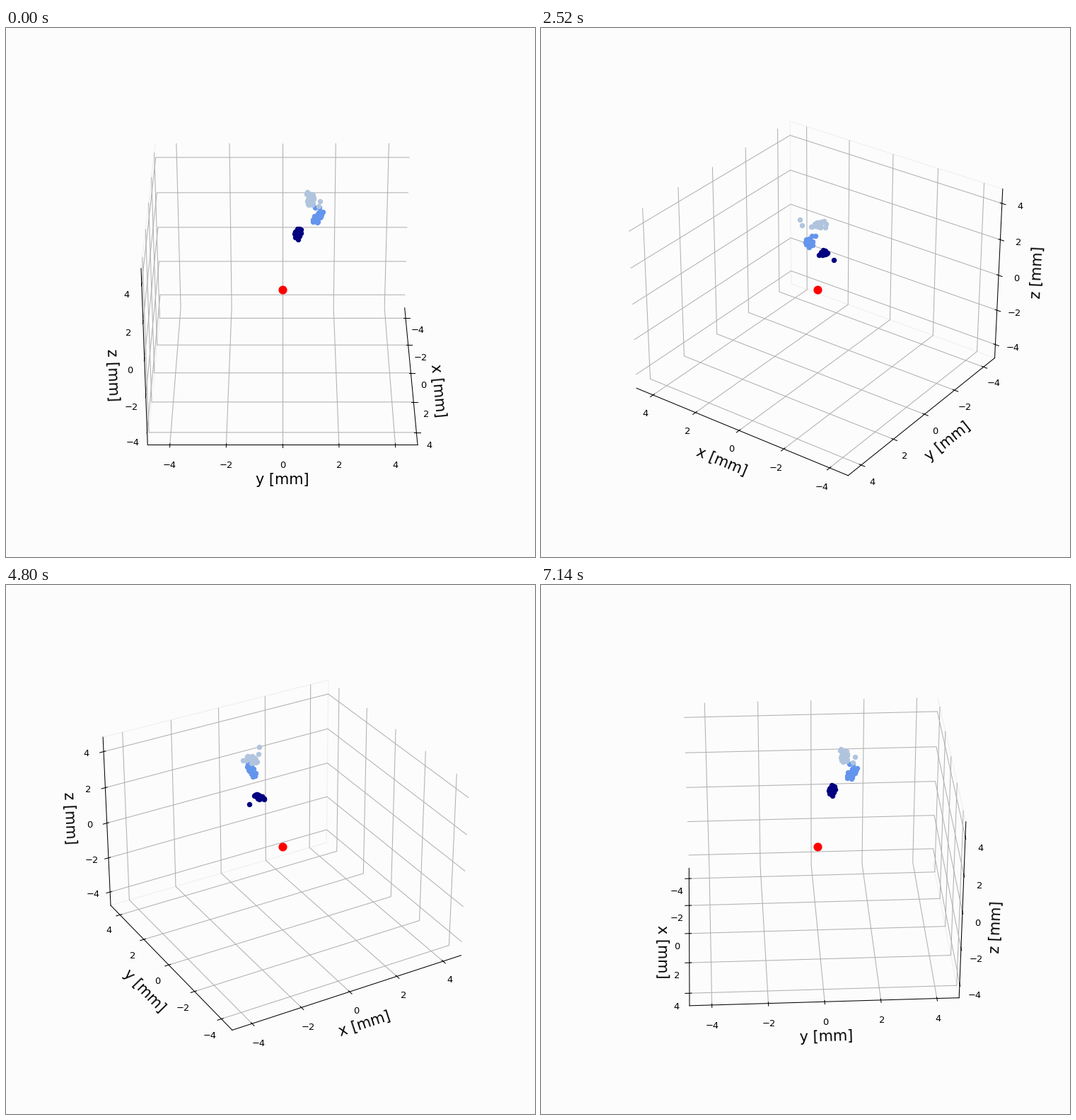
Write a matplotlib script that moves like this. It is 748x748 px and loops after 7.2 s.

```python
import numpy as np
import matplotlib.pyplot as plt
from matplotlib.animation import FuncAnimation

FRAMES, INTERVAL = 120, 60
LIMIT = 4.6 * 25 / 24
PAPER = "#fcfcfc"
DOTS = 24

plt.rcParams["font.family"] = "DejaVu Sans"
rng = np.random.default_rng(11)

fig = plt.figure(figsize=(8, 8), dpi=93.5, facecolor=PAPER)
ax = fig.add_subplot(projection="3d", facecolor=PAPER)


def streak(center, axis, jitter):
    """Dots scattered around a short line through center."""
    along = rng.uniform(-1, 1, (DOTS, 1)) * axis
    noise = np.clip(rng.normal(size=(DOTS, 3)), -1.5, 1.5) * jitter
    return center + along + noise


def dots(points, color, size):
    ax.scatter(*np.transpose(points), s=size, color=color, depthshade=False)


def cluster(color, center, axis, jitter, strays):
    dots(np.vstack([streak(center, axis, jitter), strays]), color, 22)


def style_axis(axis, name):
    axis.set_label_text(f"{name} [mm]", fontsize=16)
    axis.set_ticks(range(-4, 5, 2))
    axis.pane.fill = False
    axis.pane.set_visible(name == "y")


cluster("navy", (-0.68, 0.57, 2.66), (-0.12, 0.03, 0.08), 0.07,
        [(-1.10, 0.51, 2.43), (-0.45, 0.56, 2.47)])
cluster("cornflowerblue", (-0.59, 1.30, 3.68), (-0.05, 0.08, 0.22), 0.09,
        [(-0.40, 1.25, 3.42), (-0.76, 1.18, 3.99)])
cluster("lightsteelblue", (-0.77, 1.02, 4.48), (-0.22, -0.02, 0.14), 0.09,
        [(-0.20, 1.35, 4.74), (-0.26, 1.28, 4.40)])
dots([(0, 0, 0)], "red", 70)

for axis, name in zip((ax.xaxis, ax.yaxis, ax.zaxis), "xyz"):
    style_axis(axis, name)
ax.set(xlim=(-LIMIT, LIMIT), ylim=(-LIMIT, LIMIT), zlim=(-LIMIT, LIMIT))


def update(i):
    ax.view_init(elev=30, azim=360 * i / FRAMES)
    return []


anim = FuncAnimation(fig, update, frames=FRAMES, interval=INTERVAL,
                     repeat=True, repeat_delay=0, blit=False)
plt.show()
```
